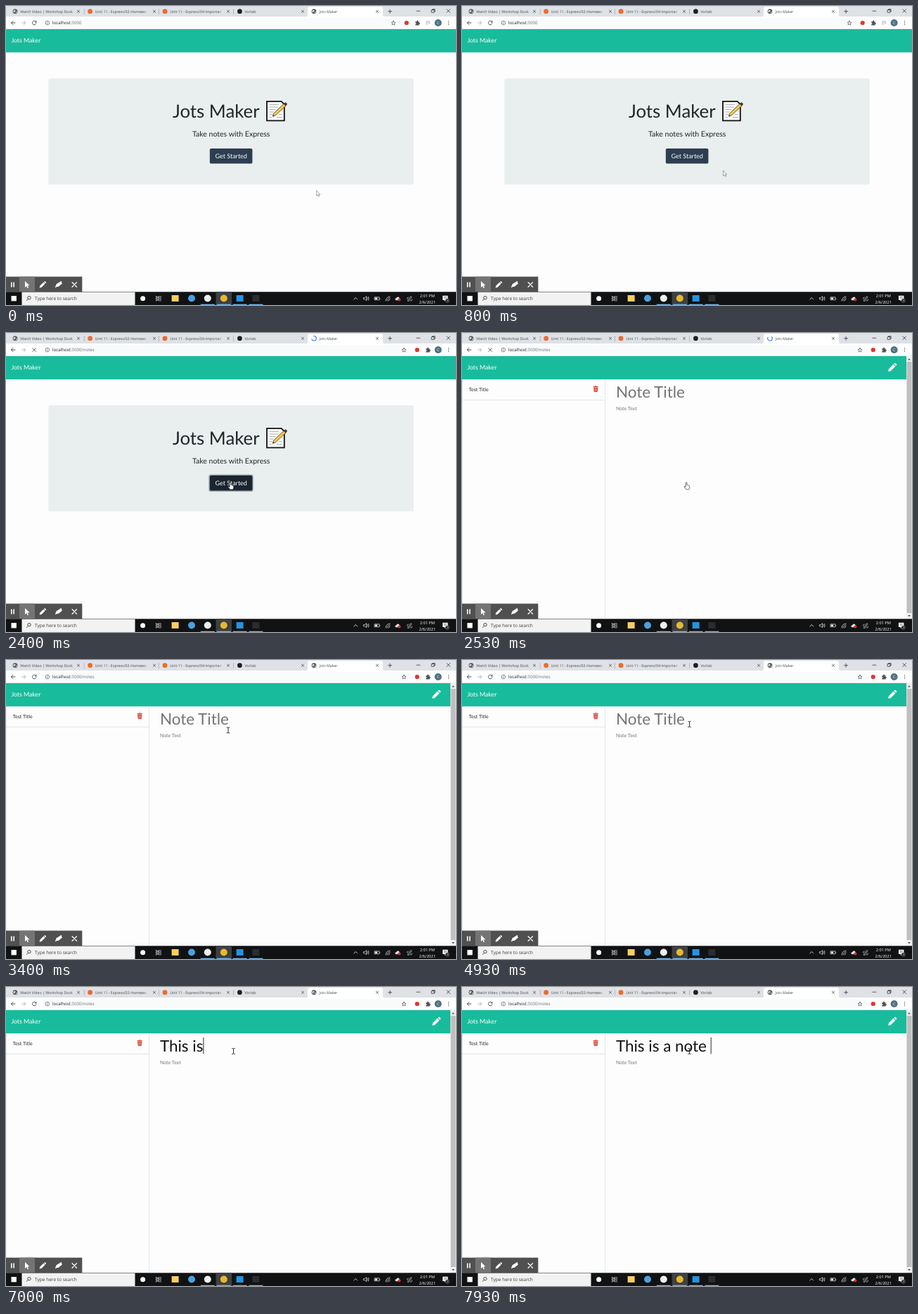
Recreate the animation shown at these times as an HTML page. Size 640 px wide and 426 px high, loop 8000 ms.

```html
<!DOCTYPE html>
<html lang="en">
<head>
<meta charset="utf-8">
<title>Jots Maker</title>
<style>
  html, body { margin: 0; width: 100%; height: 100%; overflow: hidden; background: #fdfdfd; }
  svg { display: block; width: 100vw; height: 100vh; }
  text { text-rendering: geometricPrecision; white-space: pre; }
  .ui { font-family: "Open Sans", "Noto Sans", sans-serif; }
  .web { font-family: Lato, sans-serif; }
  .tab { font-size: 5.25px; fill: #45494d; }
  .line { fill: none; stroke-linecap: round; stroke-linejoin: round; }
</style>
</head>
<body>
<svg id="stage" viewBox="0 0 640 426" preserveAspectRatio="none">
  <defs>
    <linearGradient id="fade">
      <stop offset="0" stop-color="#dee1e6" stop-opacity="0"/>
      <stop offset="1" stop-color="#dee1e6"/>
    </linearGradient>
    <g id="globe">
      <circle r="3.4" fill="#5a5e63"/>
      <path d="M-2.6-.9Q-1-2.2 .6-1.4L-.2 .3L-1.4 .2L-1 2.2Q-2.6 1.4-2.6-.9M1.2 .2L2.6 .4Q2.2 2 1 2.4Z" fill="#eceef0"/>
    </g>
    <path id="cross" d="M-1.6-1.6L1.6 1.6M1.6-1.6L-1.6 1.6" class="line"/>
    <path id="pen" d="M-5.8 5.8L-5.2 2.4L1.6-4.4L4.4-1.6L-2.4 5.2ZM2.3-5.1L3.3-6Q4-6.5 4.7-5.9L5.9-4.7Q6.5-4 6-3.3L5.1-2.3Z"/>
  </defs>

  <rect width="640" height="426" fill="#fdfdfd"/>

  <!-- landing page -->
  <g id="home" class="web" fill="#212529">
    <rect y="33" width="640" height="33.1" fill="#18bc9c"/>
    <rect x="60.4" y="103.3" width="519.2" height="151" rx="1.9" fill="#e9eeee"/>
    <text x="237" y="158.6" font-size="25.8">Jots Maker</text>
    <g id="memo">
      <path d="M371 135.8H391.5L395.8 140V163.3H371Z" fill="#fafafa" stroke="#111" stroke-width="1.8"/>
      <path d="M374.5 140.5H388M374.5 144H386.5M374.5 147.5H383.5M374.5 151H381M374.5 154.5H378.5M374.5 158.5H377.5M385 158.5H392.5M387.5 154.5H392.5" stroke="#a9acae" stroke-width=".9" fill="none"/>
      <path d="M379.4 157.2L380.6 153.2L396 138.4Q397.6 137.2 398.9 138.5Q400.1 139.9 398.8 141.2L383.3 155.9Z" fill="#f8c94a" stroke="#222" stroke-width=".7" stroke-linejoin="round"/>
      <path d="M396 138.4Q397.6 137.2 398.9 138.5Q400.1 139.9 398.8 141.2L397.5 142.4L394.7 139.7Z" fill="#4a3a30"/>
      <path d="M379.4 157.2L380 155.2L381.3 156.6Z" fill="#111"/>
    </g>
    <text x="320.2" y="185.7" font-size="10.56" text-anchor="middle">Take notes with Express</text>
    <rect id="ring" x="288.3" y="201.5" width="63.4" height="24.6" rx="3.2" fill="#9aa5ae"/>
    <rect id="btn" x="289.8" y="203" width="60.6" height="21.6" rx="2.2"/>
    <text x="320.2" y="217.1" font-size="9" text-anchor="middle" fill="#fff">Get Started</text>
  </g>

  <!-- notes page -->
  <g id="notes" class="web">
    <rect y="33" width="632" height="33.1" fill="#18bc9c"/>
    <use href="#pen" x="612" y="49" fill="#fff"/>
    <path d="M203.5 66V407M.3 66V407M0 95.5H203.5" stroke="#dde0e2" stroke-width=".8" fill="none"/>
    <text x="9.8" y="83" font-size="7.02" fill="#212529">Test Title</text>
    <path d="M186.6 76H188.8L189.3 75.3H191.1L191.6 76H193.8V77.2H186.6ZM187.1 77.8H193.3L192.9 83.1Q192.8 83.9 192 83.9H188.4Q187.6 83.9 187.5 83.1Z" fill="#e0483a"/>
    <path d="M188.9 78.9V82.8M190.2 78.9V82.8M191.5 78.9V82.8" stroke="#f7c3bd" stroke-width=".5"/>
    <text id="title" x="218.9" y="91.8" font-size="22.45"></text>
    <text x="218.9" y="110" font-size="7.02" fill="#757575">Note Text</text>
    <rect id="caret" y="72" width=".9" height="23.4" fill="#111"/>
    <rect x="632" y="33" width="8" height="374" fill="#f1f1f1"/>
    <rect x="632.6" y="41" width="6.8" height="358" fill="#bfbfbf"/>
    <path d="M634 38.4L636 36.2L638 38.4ZM634 402L636 404.2L638 402Z" fill="#505050"/>
  </g>

  <!-- browser chrome -->
  <g class="ui">
    <rect width="640" height="15.5" fill="#dee1e6"/>
    <path d="M426 15.5Q429 15.5 429 12.5V4Q429 1 432 1H533Q536 1 536 4V12.5Q536 15.5 539 15.5Z" fill="#fff"/>
    <rect y="15" width="640" height="18" fill="#fff"/>
    <rect y="32.5" width="640" height=".5" fill="#dadce0"/>
    <path d="M111.3 4V12M217.4 4V12M323.5 4V12" stroke="#9a9da2" stroke-width=".6"/>
    <g id="tabs"></g>
    <use href="#globe" x="438" y="7.7" id="favicon"/>
    <g id="spin"><path d="M0-3.3A3.3 3.3 0 1 1-3.1 1.1" class="line" stroke="#3b7ded" stroke-width="1.1"/></g>
    <path d="M543.2 7.7H549M546.1 4.8V10.6" stroke="#45494d" stroke-width=".9"/>
    <path d="M583.8 7.2H588.8M605.4 5.6H609V9.2H605.4ZM606.6 5.6V4.5H610.1V8H609M626.8 4.6L631.6 9.4M631.6 4.6L626.8 9.4" class="line" stroke="#222" stroke-width=".7"/>
    <path d="M13 24H7.4M10 21.4L7.4 24L10 26.6" class="line" stroke="#505458" stroke-width="1"/>
    <path d="M22.4 24H28M25.4 21.4L28 24L25.4 26.6" class="line" stroke="#b9bcc0" stroke-width="1"/>
    <g id="reload">
      <path d="M42.6 22.4A2.8 2.8 0 1 0 43 24.8" class="line" stroke="#505458" stroke-width="1"/>
      <path d="M43.4 20.6V23.4H40.6Z" fill="#505458"/>
    </g>
    <path id="stop" d="M37.8 21.6L42.6 26.4M42.6 21.6L37.8 26.4" class="line" stroke="#505458" stroke-width="1"/>
    <rect id="omni" x="51" y="17.6" height="13" rx="6.5" fill="#f9fafa"/>
    <circle cx="58.8" cy="24" r="2.8" fill="none" stroke="#5f6368" stroke-width=".7"/>
    <path d="M58.8 23.5V25.5M58.8 22.1V22.7" stroke="#5f6368" stroke-width=".8"/>
    <text x="66" y="26.2" font-size="6.15" fill="#202124">localhost<tspan id="path" fill="#6b6f74"></tspan></text>
    <g id="tools">
      <path d="M551 21.2L551.9 23.2L554 23.4L552.4 24.8L552.9 26.9L551 25.8L549.1 26.9L549.6 24.8L548 23.4L550.1 23.2Z" class="line" stroke="#505458" stroke-width=".7"/>
      <circle cx="569.7" cy="24" r="3.1" fill="#e0382f"/>
      <path d="M582.2 22.3H584Q584 20.6 585.1 20.6Q586.2 20.6 586.2 22.3H587.6V24Q589 24 589 25Q589 26 587.6 26V27.4H582.2V26Q583.4 26 583.4 24.9Q583.4 23.9 582.2 23.9Z" fill="#505458"/>
    </g>
    <path id="queue" d="M597 21.8H602.2M597 23.8H602.2M597 25.8H600M602.6 21.8V25.8" stroke="#a7aaae" stroke-width=".8" fill="none"/>
    <circle cx="614.6" cy="24" r="5" fill="#4d7282"/>
    <text x="614.6" y="26" font-size="5.4" fill="#fff" text-anchor="middle">C</text>
    <g fill="#505458"><circle cx="629.5" cy="21.6" r=".7"/><circle cx="629.5" cy="24" r=".7"/><circle cx="629.5" cy="26.4" r=".7"/></g>
  </g>
  <text id="brand" class="web" x="7.4" y="52.3" font-size="8.77" fill="#fff">Jots Maker</text>

  <!-- recorder toolbar -->
  <g>
    <rect y="385.6" width="108.3" height="21.8" fill="#505050"/>
    <rect x="19" y="385.6" width="22" height="21.8" fill="#747474"/>
    <path d="M7.8 393.4V400.6M11.2 393.4V400.6" stroke="#fff" stroke-width="1.6"/>
    <path d="M27 392L33.4 398.2L30.6 398.5L32.1 401.6L30.7 402.2L29.3 399.1L27 400.9Z" fill="#fff"/>
    <use href="#pen" transform="translate(52.2 397) scale(.78)" fill="#fff"/>
    <path d="M69.8 401.6L71.4 396.6L78.6 391.8L79.8 395.6L74.8 399.8L72.4 400Z" fill="#fff"/>
    <use href="#cross" transform="translate(97.3 397) scale(2)" stroke="#fff" stroke-width=".65"/>
  </g>
  <g id="bubble" class="ui">
    <path d="M0 397.6H52Q54.4 397.6 54.4 400V407.3H0Z" fill="#dee1e6" stroke="#b8bbc0" stroke-width=".4"/>
    <text x="2" y="404.3" font-size="5.15" fill="#54585c">localhost:3000/notes</text>
  </g>

  <!-- taskbar -->
  <g class="ui">
    <rect y="407.3" width="640" height="18.7" fill="#101214"/>
    <rect x="7.5" y="413" width="7.4" height="7.4" fill="#fff"/>
    <rect x="22.5" y="407.7" width="161" height="18.3" fill="#f2f2f2"/>
    <circle cx="33" cy="415.7" r="2.2" fill="none" stroke="#222" stroke-width=".8"/>
    <path d="M31.4 417.4L29.2 419.8" stroke="#222" stroke-width=".8"/>
    <text x="41" y="419.3" font-size="6.55" fill="#3c3c3c">Type here to search</text>
    <circle cx="194.6" cy="416.7" r="3.5" fill="#fff"/>
    <path d="M213.4 413V414.4H218V413M213.4 420.6V419.2H218V420.6M213.4 415.8H218V417.8H213.4ZM220 413V420.6" fill="none" stroke="#ddd" stroke-width=".8"/>
    <rect x="298.5" y="407.3" width="22.6" height="18.7" fill="#3d4144"/>
    <g id="apps"></g>
    <path d="M494.8 418L497.3 415.5L499.8 418" class="line" stroke="#eee" stroke-width=".8"/>
    <path d="M508.8 415.6H510.4L512.6 413.6V419.8L510.4 417.8H508.8ZM514 415.2Q515 416.7 514 418.2M515.4 414.2Q517 416.7 515.4 419.2" class="line" stroke="#eee" stroke-width=".7"/>
    <path d="M524 414.8H531V418.8H524ZM531.7 416V417.6" fill="none" stroke="#eee" stroke-width=".7"/>
    <rect x="524.8" y="415.5" width="3.4" height="2.6" fill="#eee"/>
    <path d="M540 420A6 6 0 0 1 546 414M542 420A4 4 0 0 1 546 416M544 420A2 2 0 0 1 546 418" class="line" stroke="#ddd" stroke-width=".8"/>
    <path d="M554.6 419.2Q552.8 418.6 553.6 416.9Q554.4 416 555.3 416.3Q556 414 558 414.6Q559.4 415 559.6 416.4Q561.2 416.6 561 418.2Q560.8 419.2 560 419.2Z" fill="#e8e8e8"/>
    <circle cx="559.4" cy="418.6" r="2" fill="#dd2c2c"/>
    <path d="M571.3 419.8L575.6 413.6L577 414.6L572.8 420.4ZM570.6 417.4Q570 415 572.2 415M575 420Q578 420.6 577.6 418" class="line" stroke="#ddd" stroke-width=".7"/>
    <g font-size="5.65" fill="#fff" text-anchor="middle">
      <text x="599.3" y="414.6">2:01 PM</text>
      <text x="599.3" y="423.5">2/6/2021</text>
    </g>
    <path d="M621 412.8H628.4V419H625.4L623.6 420.8V419H621Z" fill="#fff"/>
    <path d="M622.4 414.6H627M622.4 416.2H627" stroke="#222" stroke-width=".5"/>
    <circle cx="627.6" cy="419.6" r="2.7" fill="#1c1e20" stroke="#ccc" stroke-width=".4"/>
    <text x="627.6" y="421.2" font-size="4" fill="#fff" text-anchor="middle">3</text>
  </g>

  <!-- pointers, hot spot at 0,0 -->
  <g id="pointer">
    <path id="arrow" d="M0 0V7.6L1.8 6L3 8.6L4.1 8.1L3 5.6H5.2Z" fill="#fff" stroke="#6a6a6a" stroke-width=".6"/>
    <path id="hand" d="M-.8 .7Q-.8-.2 0-.2Q.9-.2 .9 .7V3.7Q1.8 3.2 2.2 4Q3.2 3.6 3.5 4.5Q4.7 4.3 4.7 5.6V7.4L3.7 9.9H-.2L-2.9 6.5Q-3.4 5.4-2.3 5.4L-.8 6.5Z" fill="#fff" stroke="#111" stroke-width=".6"/>
    <path id="beam" d="M-1.9-4Q-.2-4.1 0-3.3Q.2-4.1 1.9-4M0-3.3V3.3M-1.9 4Q-.2 4.1 0 3.3Q.2 4.1 1.9 4" class="line" stroke="#111" stroke-width=".85"/>
  </g>
</svg>
<script>
  const $ = id => document.getElementById(id);
  const show = (id, on) => $(id).setAttribute('display', on ? 'inline' : 'none');
  const move = (id, x, y, turn = 0) =>
    $(id).setAttribute('transform', `translate(${x} ${y}) rotate(${turn})`);

  const LOOP = 8000, STEP = 1000 / 15, BLINK = 530;
  const BUBBLE = 1520, CLICK = 1730, LOAD = 1790, PAGE = 2530, READY = 2660, FOCUS = 4000;

  // icon, icon x, title, title end
  const tabs = [
    ['globe', 13, 'Watch Video | Workshop Dock', 97],
    ['#ee6a2c', 119.6, 'Unit 11 - Express/02-Homewo', 205],
    ['#ee6a2c', 226, 'Unit 11 - Express/04-Importan', 310],
    ['#1d2125', 332.4, 'Vorlab', 416],
    ['', 438.6, 'Jots Maker', 522],
  ];
  $('tabs').innerHTML = tabs.map(([icon, x, title, end]) => {
    const mark = icon === 'globe' ? `<use href="#globe" x="${x}" y="7.7"/>`
      : icon ? `<circle cx="${x}" cy="7.7" r="3.4" fill="${icon}"/>` : '';
    const fade = title.startsWith('Unit')
      ? `<rect x="${end - 9}" y="2" width="9.5" height="11" fill="url(#fade)"/>` : '';
    return `${mark}<text class="tab" x="${x + 7.2}" y="9.6">${title}</text>${fade}
      <use href="#cross" x="${end + 6}" y="7.7" stroke="#45494d" stroke-width=".8"/>`;
  }).join('');

  // x, colour, shape, running
  const apps = [
    [240.6, '#f6cf5f', 'box', 0], [264, '#4ba0dc', 'dot', 0], [286.8, '#f0f0f0', 'dot', 1],
    [309.8, '#e8b92e', 'dot', 1], [332.6, '#2693e0', 'box', 1], [355.4, '#2a2d30', 'box', 1],
  ];
  $('apps').innerHTML = apps.map(([x, fill, shape, running]) =>
    (shape === 'dot' ? `<circle cx="${x}" cy="416.5" r="5" fill="${fill}"/>`
      : `<rect x="${x - 5}" y="412" width="10" height="9" fill="${fill}"/>`) +
    (running ? `<rect x="${x - 10}" y="424.8" width="20" height="1.2" fill="#76b9ed"/>` : '')).join('');

  // time, x, y
  const track = [
    [0, 441.6, 262.8], [1460, 319, 213], [3000, 319, 213],
    [3400, 316, 100], [3600, 323.5, 91.5], [LOOP, 323.5, 91.5],
  ];
  const typing = [
    [5330, 'T'], [5460, 'h'], [5530, 'i'], [5660, 's'], [5850, ' '],
    [6860, 'i'], [6930, 's'], [7060, ' '], [7130, 'a'], [7200, ' '],
    [7330, 'n'], [7400, 'o'], [7460, 't'], [7660, 'e'], [7860, ' '],
  ];

  function pointAt(t) {
    const i = Math.max(1, track.findIndex(k => k[0] > t));
    const [a, b] = [track[i - 1], track[i]];
    const u = (t - a[0]) / (b[0] - a[0]);
    const e = u * u * (3 - 2 * u);
    return [a[1] + (b[1] - a[1]) * e, a[2] + (b[2] - a[2]) * e];
  }

  function drawTitle(t) {
    const typed = typing.filter(k => k[0] <= t);
    const text = typed.map(k => k[1]).join('').replace(/ /g, '\u00a0');
    const title = $('title');
    title.textContent = text || 'Note Title';
    title.setAttribute('fill', text ? '#111' : '#757575');
    const since = typed.length ? typed[typed.length - 1][0] : FOCUS;
    show('caret', t >= FOCUS && Math.floor((t - since) / BLINK) % 2 === 0);
    $('caret').setAttribute('x', 218.9 + (text ? title.getComputedTextLength() : 0));
  }

  function draw(now) {
    const t = Math.floor((now % LOOP + 8) / STEP) * STEP;
    const [x, y] = pointAt(t);
    const started = t >= LOAD, loading = started && t < READY;
    const page = t >= PAGE, beam = t >= READY;
    const hover = !beam && x > 290 && x < 350.5 && y > 203 && y < 225;

    show('home', !page);
    show('notes', page);
    show('ring', t >= CLICK);
    $('btn').setAttribute('fill', t >= CLICK ? '#1a252f' : hover ? '#1e2b37' : '#2c3e50');
    show('bubble', t >= BUBBLE && !started);

    show('favicon', !loading);
    show('spin', loading);
    move('spin', 438, 7.7, (t - 2400) * .36);
    show('reload', !loading);
    show('stop', loading);
    $('path').textContent = started ? ':3000/notes' : ':3000';
    $('omni').setAttribute('width', started ? 523 : 508);
    move('tools', started ? 15 : 0, 0);
    show('queue', !started);

    drawTitle(t);
    show('arrow', !hover && !beam);
    show('hand', hover);
    show('beam', beam);
    move('pointer', x, y);
  }

  const start = performance.now();
  function tick() {
    draw(performance.now() - start);
    requestAnimationFrame(tick);
  }
  tick();
</script>
</body>
</html>
```
